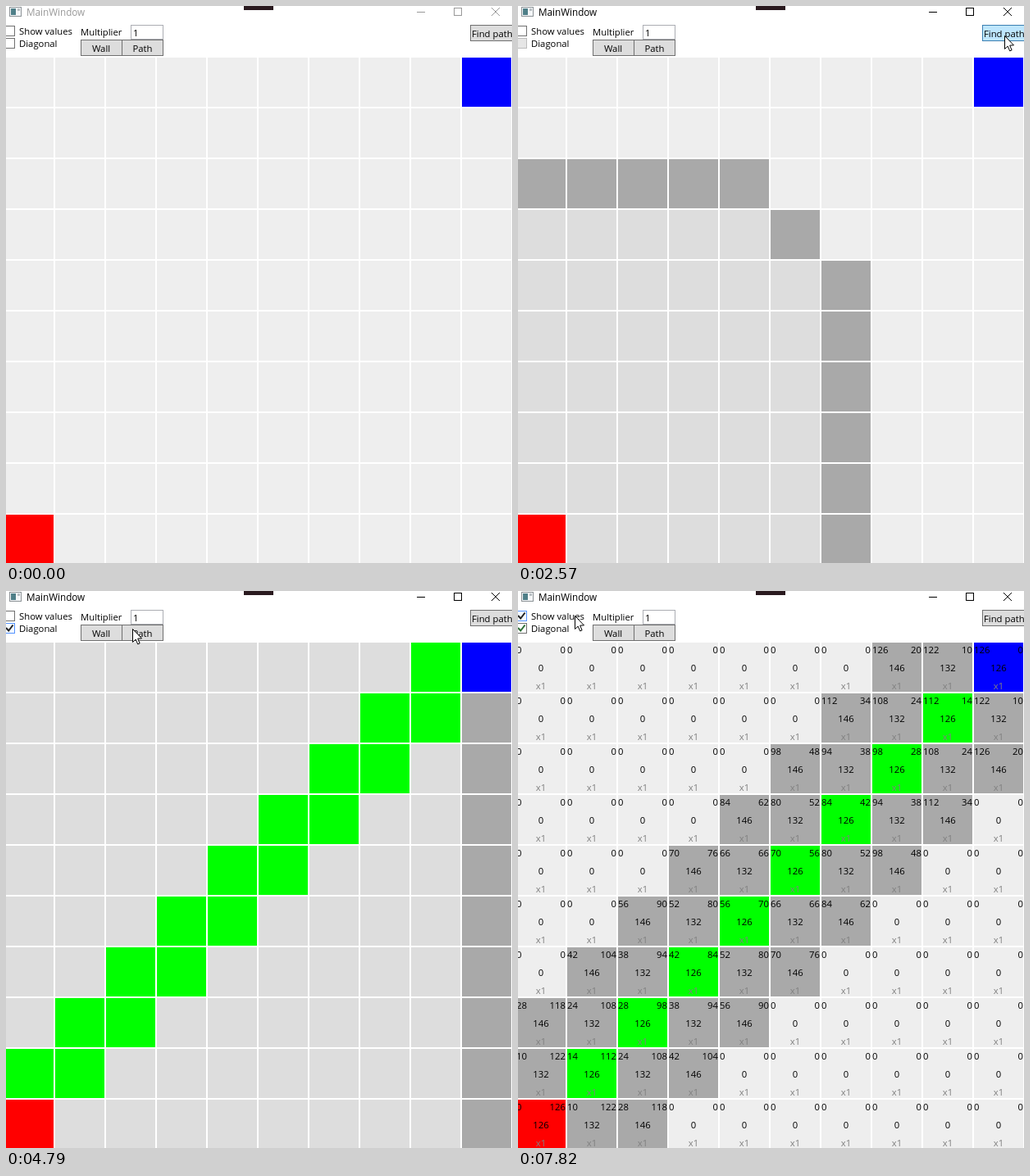
Recreate the animation shown at these times as an HTML page with a canvas. Size 617 by 680 pixels, loop 8 s.

```html
<!DOCTYPE html>
<html lang="en">
<head>
<meta charset="utf-8">
<title>Path finder</title>
<style>
  html, body { margin: 0; width: 100%; height: 100%; overflow: hidden; background: #fff; }
  canvas { display: block; }
</style>
</head>
<body>
<canvas id="stage" width="617" height="680"></canvas>
<script>
const ctx = document.getElementById('stage').getContext('2d');
const LOOP = 8000, STEP = 68.5, N = 10;
const FONT = '"Open Sans", "Noto Sans", sans-serif';

const BURSTS = [0, 920, 1750, 2570, 3420, 3690, 4310, 4790, 5270, 6560, 7170];

// Pointer track: time, x, y
const TRACK = [
  [0, 640, 45], [919, 640, 45], [920, 612, 45], [1399, 593, 38], [1536, 593, 36],
  [2570, 593, 36], [2981, 145, 36], [3340, 129, 35], [3488, 129, 46], [3690, 129, 46],
  [4030, 5, 43], [4310, 5, 43], [4515, 30, 39], [4789, 30, 39], [4790, 154, 46],
  [4995, 592, 45], [5270, 592, 45], [5338, 600, 38], [6560, 600, 38], [7020, 5, 34],
  [7300, 5, 34], [7718, 69, 30], [8000, 69, 30]
];

const FIRST_PATH = 3420, RESET = 5544, SECOND_PATH = 5700, VALUES = 7375;

function snap(t) {
  const start = BURSTS.filter(b => b <= t).pop();
  return start + Math.floor((t - start) / STEP) * STEP;
}

function pointerAt(t) {
  const i = Math.max(1, TRACK.findIndex(k => k[0] >= t));
  const [t0, x0, y0] = TRACK[i - 1], [t1, x1, y1] = TRACK[i];
  const p = (t - t0) / (t1 - t0);
  return { x: Math.round(x0 + (x1 - x0) * p), y: Math.round(y0 + (y1 - y0) * p) };
}

function text(str, x, y, color = '#000', align = 'left', size = 11.3) {
  ctx.font = `${size}px ${FONT}`;
  ctx.fillStyle = color;
  ctx.textAlign = align;
  ctx.fillText(str, x, y);
}

function box(x, y, w, h, fill, border) {
  ctx.fillStyle = border;
  ctx.fillRect(x, y, w, h);
  ctx.fillStyle = fill;
  ctx.fillRect(x + 1, y + 1, w - 2, h - 2);
}

function line(points, color, width = 1) {
  ctx.beginPath();
  points.forEach(([x, y]) => ctx.lineTo(x, y));
  ctx.strokeStyle = color;
  ctx.lineWidth = width;
  ctx.stroke();
}

function checkbox(y, { hover, disabled, tick }) {
  if (disabled) box(-2, y, 13, 13, '#e6e6e6', '#bcbcbc');
  else if (hover) box(-2, y, 13, 13, '#f3f9ff', '#5593ff');
  else box(-2, y, 13, 13, '#fff', '#707070');
  if (tick) line([[0, y + 6], [3.2, y + 9.5], [8.5, y + 2.5]], tick, 2);
}

// Order in which the four-way search closes cells; u counts rows from the bottom
const order = (c, u) => (u > c ? u * u + c : c * (c + 1) + u) + 1;

function squareSearch(c, u, t) {
  if (t >= FIRST_PATH && (u === c || u === c + 1)) return '#0f0';
  const n = t >= FIRST_PATH ? 90 : Math.min(90, Math.floor(21.5 + (t - 2229.5) * 0.05855));
  const closed = (a, b) => a >= 0 && b >= 0 && a < N && b < N && order(a, b) <= n;
  if (closed(c, u)) return '#ddd';
  const open = closed(c - 1, u) || closed(c + 1, u) || closed(c, u - 1) || closed(c, u + 1);
  return open ? '#a9a9a9' : '#eee';
}

function diagonalSearch(c, u, t) {
  const n = Math.min(9, 1 + Math.floor((t - RESET) / 17));
  if (c === u && c < n) return t >= SECOND_PATH ? '#0f0' : '#ddd';
  for (let i = 0; i < n; i++)
    if (Math.abs(c - i) <= 1 && Math.abs(u - i) <= 1) return '#a9a9a9';
  return '#eee';
}

function cellColor(c, u, t) {
  if (c === 0 && u === 0) return '#f00';
  if (c === N - 1 && u === N - 1) return '#00f';
  return t < RESET ? squareSearch(c, u, t) : diagonalSearch(c, u, t);
}

function costs(c, u) {
  const off = Math.abs(c - u);
  if (off > 2) return [0, 0];
  const g = off === 2 ? 14 * Math.max(c, u) : 14 * Math.min(c, u) + 10 * off;
  const h = 14 * (9 - Math.max(c, u)) + 10 * off;
  return [g, h];
}

function grid(t) {
  for (let r = 0; r < N; r++) {
    for (let c = 0; c < N; c++) {
      const x = 62 * c - 2, y = 62 * r + 63, u = N - 1 - r;
      ctx.fillStyle = cellColor(c, u, t);
      ctx.fillRect(x, y, 60, 60);
      if (t < VALUES) continue;
      const [g, h] = costs(c, u);
      text(g, x, y + 13);
      text(h, x + 60, y + 13, '#000', 'right');
      text(g + h, x + 30, y + 35, '#000', 'center');
      text('x1', x + 30, y + 57, '#808080', 'center');
    }
  }
}

function titleBar(active) {
  const ink = active ? '#000' : '#999';
  box(4, 1, 15, 12, '#f4f6f8', '#8c9296');
  ctx.fillStyle = '#4f7f88';
  ctx.fillRect(6, 3, 6, 8);
  ctx.fillStyle = '#b9c0c4';
  ctx.fillRect(14, 3, 3, 3);
  text('MainWindow', 25, 12, ink, 'left', 11.7);
  ctx.fillStyle = '#2a1a1f';
  ctx.fillRect(290, 0, 36, 5);
  line([[501, 7.5], [511, 7.5]], ink);
  box(546, 2, 10, 10, '#fff', ink);
  line([[592, 2], [602, 12]], ink);
  line([[602, 2], [592, 12]], ink);
}

function toolbar(t, p) {
  const running = (t >= 1885 && t < FIRST_PATH) || (t >= RESET && t < SECOND_PATH);
  const diagHover = t > 3900 && t < 4850;
  const diagTick = t >= 4375 && (diagHover ? '#212121' : '#2c6e35');
  const showHover = t > 6950;
  checkbox(24, { hover: showHover, tick: t >= 7230 && '#212121' });
  checkbox(39, { hover: diagHover, disabled: running, tick: diagTick });
  text('Show values', 16, 35);
  text('Diagonal', 16, 50);
  text('Multiplier', 91, 36);
  box(152, 23, 40, 18, '#fff', '#abadb3');
  text('1', 155, 37);
  box(91, 41, 51, 20, '#ddd', '#707070');
  box(141, 41, 51, 20, '#ddd', '#707070');
  text('Wall', 116, 56, '#000', 'center');
  text('Path', 166.5, 56, '#000', 'center');
  const hover = p.x >= 566 && p.x < 617 && p.y < 43;
  const pressed = (t >= 1750 && t < 1850) || (t >= 5470 && t < RESET);
  box(566, 23, 54, 20, pressed ? '#c4e5f6' : hover ? '#bee6fd' : '#ddd',
    pressed ? '#2c628b' : hover ? '#3c7fb1' : '#707070');
  text('Find path', 568, 38);
}

function pointer({ x, y }, t) {
  ctx.save();
  ctx.translate(x + 0.5, y + 0.5);
  if (t < FIRST_PATH && x > 135 && x < 192) {
    line([[-4, -8], [3, -8]], '#888');
    line([[-4, 8], [3, 8]], '#888');
    line([[0, -8], [0, 8]], '#888');
  } else {
    ctx.beginPath();
    [[0, 0], [0, 16], [3.7, 12.6], [6.2, 18.4], [8.6, 17.4], [6.2, 11.6], [11, 11.4]]
      .forEach(([a, b]) => ctx.lineTo(a, b));
    ctx.closePath();
    ctx.fillStyle = '#fff';
    ctx.fill();
    ctx.strokeStyle = '#000';
    ctx.lineWidth = 1;
    ctx.stroke();
  }
  ctx.restore();
}

function draw(now) {
  const t = snap(now % LOOP), p = pointerAt(t);
  ctx.fillStyle = '#fff';
  ctx.fillRect(0, 0, 617, 680);
  titleBar(t >= 1750);
  toolbar(t, p);
  grid(t);
  pointer(p, t);
}

let begin;
function frame(now) {
  begin ??= now;
  draw(Math.max(0, now - begin));
  requestAnimationFrame(frame);
}
requestAnimationFrame(frame);
</script>
</body>
</html>
```
